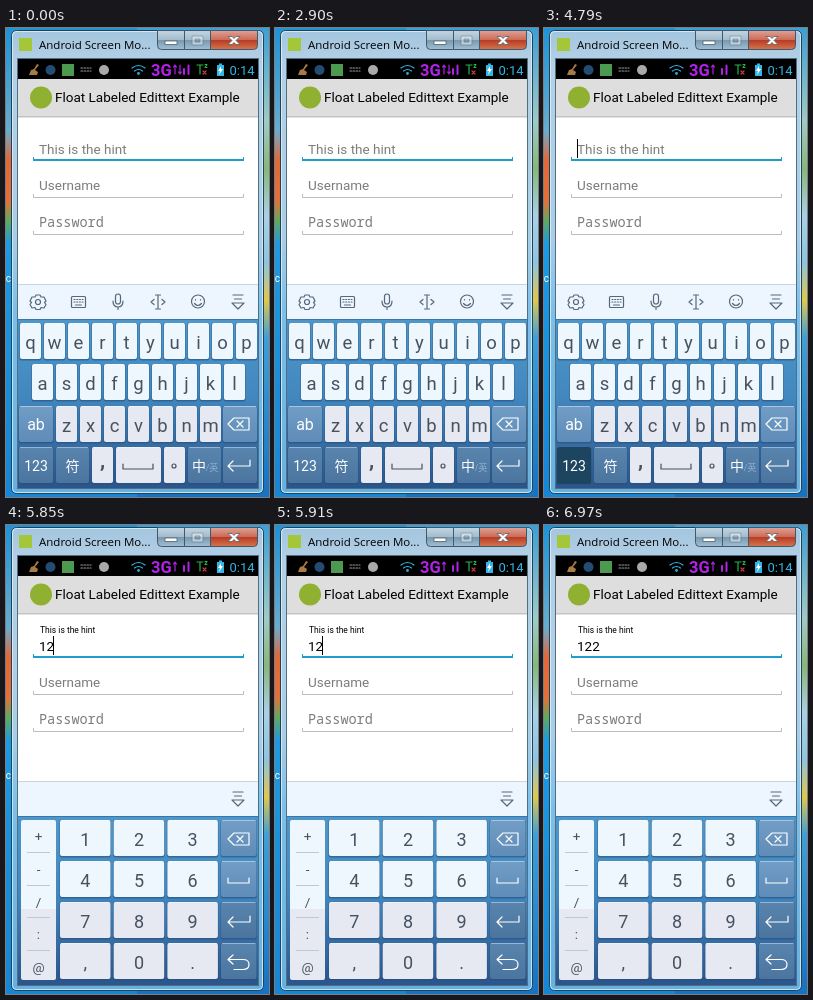
Recreate the animation shown at these times as an HTML page. Size 263 by 469 pixels, loop 8000 ms.

```html
<!DOCTYPE html>
<html lang="en">
<head>
<meta charset="utf-8">
<title>Float label demo</title>
<style>
html, body { margin: 0; width: 100%; height: 100%; overflow: hidden; background: #2c8dcc; }
svg { display: block; width: 100vw; height: 100vh; }
text { font-family: Roboto, "Noto Sans CJK SC", "Noto Sans CJK", sans-serif; font-size: 13.5px; }
.hint { fill: #7d7d7d; }
.mono { font-family: "Noto Sans Mono", monospace; font-size: 13.5px; }
.title { font-family: "Open Sans", "Noto Sans", sans-serif; font-size: 11.5px; }
.key { font-size: 18px; text-anchor: middle; fill: #465260; }
.line { fill: none; stroke-width: 1.2; stroke-linecap: round; stroke-linejoin: round; }
.tool { stroke: #56677a; }
.white { stroke: #fff; }
.rest, .press, .early, .late, .one, .two { animation: 8s step-end infinite; }
.rest { animation-name: rest; }
.press { animation-name: press; }
.early { animation-name: early; }
.late { animation-name: late; }
.one { animation-name: one; }
.two { animation-name: two; }
@keyframes rest { 0% { visibility: visible } 59.875%, 100% { visibility: hidden } }
@keyframes press { 0% { visibility: hidden } 59.875% { visibility: visible } 73.125%, 100% { visibility: hidden } }
@keyframes early { 0% { visibility: visible } 73.125%, 100% { visibility: hidden } }
@keyframes late { 0% { visibility: hidden } 73.125%, 100% { visibility: visible } }
@keyframes one { 0% { visibility: hidden } 73.125% { visibility: visible } 87.125%, 100% { visibility: hidden } }
@keyframes two { 0% { visibility: hidden } 87.125%, 100% { visibility: visible } }
</style>
</head>
<body>
<svg viewBox="0 0 263 469" preserveAspectRatio="none">
  <defs>
    <linearGradient id="deskLeft" x2="0" y2="1">
      <stop offset="0" stop-color="#1f93d6"/><stop offset=".22" stop-color="#6aaccd"/>
      <stop offset=".28" stop-color="#e2683a"/><stop offset=".37" stop-color="#e2703a"/>
      <stop offset=".41" stop-color="#62a95a"/><stop offset=".46" stop-color="#1c9ae2"/>
      <stop offset="1" stop-color="#1686d6"/>
    </linearGradient>
    <linearGradient id="deskRight" x2="0" y2="1">
      <stop offset="0" stop-color="#3b9fd6"/><stop offset=".2" stop-color="#9fcbc4"/>
      <stop offset=".3" stop-color="#86b878"/><stop offset=".4" stop-color="#a9d1e6"/>
      <stop offset=".5" stop-color="#8fc4e0"/><stop offset=".58" stop-color="#e0c84a"/>
      <stop offset=".66" stop-color="#3f9fd8"/><stop offset="1" stop-color="#1672c2"/>
    </linearGradient>
    <linearGradient id="glass" x2="0" y2="1">
      <stop offset="0" stop-color="#a3c5df"/><stop offset=".07" stop-color="#b4d0e5"/>
      <stop offset=".45" stop-color="#a9cde6"/><stop offset=".6" stop-color="#7cc0ea"/>
      <stop offset="1" stop-color="#66b0e0"/>
    </linearGradient>
    <linearGradient id="button" x2="0" y2="1">
      <stop offset="0" stop-color="#c3d5e2"/><stop offset=".48" stop-color="#a4bccd"/>
      <stop offset=".5" stop-color="#7697ae"/><stop offset="1" stop-color="#9fc0d3"/>
    </linearGradient>
    <linearGradient id="close" x2="0" y2="1">
      <stop offset="0" stop-color="#e0a296"/><stop offset=".48" stop-color="#cc6c59"/>
      <stop offset=".5" stop-color="#b83a23"/><stop offset="1" stop-color="#d4764e"/>
    </linearGradient>
    <linearGradient id="board" x2="0" y2="1">
      <stop offset="0" stop-color="#4f97c9"/><stop offset=".45" stop-color="#4288bf"/>
      <stop offset="1" stop-color="#2b558b"/>
    </linearGradient>
    <linearGradient id="blue" x2="0" y2="1">
      <stop offset="0" stop-color="#719dc6"/><stop offset="1" stop-color="#5f8cb8"/>
    </linearGradient>
    <linearGradient id="deep" x2="0" y2="1">
      <stop offset="0" stop-color="#5884ad"/><stop offset="1" stop-color="#4b759f"/>
    </linearGradient>
    <g id="fold" class="line tool">
      <path d="M227 267h10M228.500 271h7M226 275h12l-6 6z"/>
    </g>
    <g id="erase" class="line white">
      <path d="M222 0l6-6h15v12h-15zM231-3l6 6m0-6l-6 6"/>
    </g>
    <path id="enter" class="line white" d="M244-5V1H222m5-5l-5 5 5 5"/>
  </defs>

  <!-- desktop and window -->
  <rect width="132" height="469" fill="url(#deskLeft)"/>
  <rect x="131" width="132" height="469" fill="url(#deskRight)"/>
  <text x="-3" y="254" fill="#fff" style="font-size:10px">Ic</text>
  <rect x="5.5" y="2.500" width="252" height="463" rx="5" fill="url(#glass)" stroke="#234256"/>
  <rect x="6.500" y="3.500" width="250" height="461" rx="4" fill="none" stroke="#e0f0f9" stroke-opacity=".8"/>
  <rect x="11.500" y="30.500" width="241" height="430" fill="#fff" stroke="#4f7084"/>
  <rect x="13" y="10" width="13" height="13" fill="#a4c639"/>
  <text class="title" x="33" y="21">Android Screen Mo...</text>
  <g stroke="#405a6b">
    <path d="M151.500 2.500V17.500q0 4 4 4H178.500V2.500z" fill="url(#button)"/>
    <path d="M178.500 2.500V21.500H204.500V2.500z" fill="url(#button)"/>
    <path d="M204.500 2.500V21.500H247.500q4 0 4-4V2.500z" fill="url(#close)"/>
    <g fill="#fff" stroke="#52616c" stroke-width=".8">
      <rect x="159" y="13" width="12" height="3.500"/>
      <path fill-rule="evenodd" opacity=".45" d="M186 8h11v9h-11zM189 11h5v3h-5z"/>
      <path d="M222 8.500h4l2 2 2-2h4l-4 4 4 4h-4l-2-2-2 2h-4l4-4z"/>
    </g>
  </g>

  <!-- status bar -->
  <rect x="12" y="31" width="240" height="20"/>
  <path d="M31 36l2 1-4 5 3 2-1 3h-8l2-5 3-1z" fill="#a87a45"/>
  <circle cx="44.500" cy="42" r="5" fill="#234c75"/>
  <rect x="56" y="36" width="12" height="12" fill="#4c9a4f"/>
  <path class="line" stroke="#9a9a9a" stroke-dasharray="1.500 1.500" d="M75 40h10M75 43h10"/>
  <circle cx="98" cy="42" r="5" fill="#a9a9a9"/>
  <g class="line" stroke="#33b5e5" stroke-width="2">
    <path d="M126 40q6.500-5 13 0M128.500 43q4-3 8 0"/>
    <circle cx="132.500" cy="45.500" r=".8"/>
  </g>
  <text x="145" y="47.500" font-weight="700" fill="#b321e8" style="font-size:16.5px">3G</text>
  <g class="line" stroke="#b321e8">
    <path d="M169 46V37m-1.500 2l1.500-2 1.500 2"/>
    <path class="rest" d="M174 37v9m-1.500-2l1.500 2 1.500-2"/>
    <path stroke-width="2" d="M178 46V41M182.500 46V37.500"/>
  </g>
  <path class="line" stroke="#26b44b" d="M191 37h6M194 37v9M199 36.500h2l-2 3h2"/>
  <path class="line" stroke="#d33a3a" d="M197 43l3 3m0-3l-3 3"/>
  <path fill="#33b5e5" d="M211 37h2v-1.500h3V37h2v11h-7z"/>
  <path fill="#fff" d="M215 38l-3 5h2l-1 4 4-6h-2z"/>
  <text x="223.500" y="46.500" fill="#33b5e5" style="font-size:13px">0:14</text>

  <!-- action bar and form -->
  <rect x="12" y="51" width="240" height="38" fill="#dedede"/>
  <rect x="12" y="88" width="240" height="1.500" fill="#c4c4c4"/>
  <circle cx="35" cy="69.500" r="11" fill="#8fb030"/>
  <text x="49" y="74">Float Labeled Edittext Example</text>

  <text class="hint early" x="33" y="126">This is the hint</text>
  <text class="late" x="34" y="108" style="font-size:8.5px">This is the hint</text>
  <text class="one" x="33" y="126">12</text>
  <text class="two" x="33" y="126">122</text>
  <rect class="press" x="33" y="111" width="1" height="19"/>
  <rect class="one" x="47" y="111" width="1" height="19"/>
  <path d="M27 129h1v2h209V129h1v4H27z" fill="#1f9ccb"/>
  <text class="hint" x="33" y="162">Username</text>
  <text class="hint mono" x="33" y="199">Password</text>
  <path d="M27.500 166v3.500h210V166M27.500 203v3.500h210V203" fill="none" stroke="#bcbcbc"/>

  <!-- keyboard -->
  <rect x="12" y="256" width="240" height="35" fill="#edf6fe"/>
  <path d="M12 256.500h240" stroke="#cbd5dd"/>
  <rect x="12" y="291" width="240" height="169" fill="url(#board)"/>
  <path d="M12 291.500h240" stroke="#3675ad"/>
  <use href="#fold"/>
  <g class="early line tool">
    <path d="M30 267h4l1 2 3 0 2 4-1.500 1.500 1.500 2-2 3.500-3-.5-1 2h-4l-1-2-3 .5-2-3.500 1.500-2-1.500-1.500 2-4h3z"/>
    <circle cx="32" cy="274" r="2.500"/>
    <rect x="65.500" y="268.500" width="14" height="11" rx="1"/>
    <path d="M68 271.500h9M68 274h9" stroke-dasharray="1 1.700"/><path d="M69.500 277h6"/>
    <rect x="109.500" y="266" width="5" height="10" rx="2.500"/>
    <path d="M107 273q0 6 5 6t5-6M112 279v2.500"/>
    <path d="M149.500 267h5M152 267v14M149.500 281h5M148 271.500l-3 2.500 3 2.500M156 271.500l3 2.500-3 2.500"/>
    <circle cx="192" cy="273.500" r="6.500"/>
    <path d="M189.500 271.500v.5M194.500 271.500v.5M188.500 275.500q3.500 4 7 0"/>
  </g>
  <g class="early" id="letters"></g>
  <g class="press">
    <rect x="13" y="419" width="34" height="37" rx="2" fill="#1e4560"/>
    <text class="key" x="30" y="443" style="font-size:14px;fill:#fff">123</text>
  </g>
  <g class="early">
    <use href="#erase" y="396"/><use href="#enter" y="437"/>
    <path class="line" stroke="#465260" d="M117 436v5h30v-5"/>
    <circle class="line" cx="168" cy="438" r="2" stroke="#465260"/>
  </g>
  <g class="late" id="digits"></g>
  <g class="late">
    <path d="M15 297q0-2 2-2h31q2 0 2 2V384H15z" fill="#eff7fe"/>
    <path d="M15 384H50V453q0 2-2 2H17q-2 0-2-2z" fill="#e6e8f2"/>
    <path d="M21 327.500h23M21 360.500h23M21 392.500h23M21 425.500h23" stroke="#bcc8d5"/>
    <g id="signs"></g>
    <use href="#erase" y="314"/><use href="#enter" y="396"/>
    <path class="line white" d="M222 353v5h21v-5M227 430l-5 4.500 5 4.500M222 434.500h15q6 0 6 5t-6 5h-9"/>
  </g>
</svg>
<script>
const LIGHT = '#eff7fe', GREY = '#e6e8f2', BLUE = 'url(#blue)', DEEP = 'url(#deep)';
const INK = '#465260';
const el = id => document.getElementById(id);

function label(x, y, text, size = 18, fill = INK) {
  return `<text class="key" x="${x}" y="${y}" style="font-size:${size}px;fill:${fill}">${text}</text>`;
}

function key(x, y, w, text, fill, size) {
  const ink = fill === BLUE || fill === DEEP ? '#fff' : INK;
  return `<rect x="${x - .5}" y="${y}" width="${w + 1}" height="37.5" rx="2" fill="#254f7c" opacity=".6"/>` +
    `<rect x="${x}" y="${y}" width="${w}" height="36" rx="2" fill="${fill}"/>` +
    `<path d="M${x + 1} ${y + .5}h${w - 2}" stroke="#fff" stroke-opacity=".4"/>` +
    label(x + w / 2, y + (size < 17 ? 24 : 25.5), text, size, ink);
}

const row = (chars, x, y, fill) =>
  [...chars].map((c, i) => key(x + i * 24, y, 21, c, fill, 18.5)).join('');

el('letters').innerHTML =
  row('qwertyuiop', 14, 295, LIGHT) +
  row('asdfghjkl', 26, 336, LIGHT) +
  row('zxcvbnm', 50, 378, GREY) +
  key(13, 378, 34, 'ab', BLUE, 16) +
  key(217, 378, 34, '', BLUE, 16) +
  key(13, 419, 34, '123', DEEP, 14) +
  key(50, 419, 33, '符', DEEP, 14) +
  key(86, 419, 21, '', GREY, 19) +
  label(96.5, 439, '<tspan font-weight="700">,</tspan>', 21) +
  key(110, 419, 45, '', GREY, 16) +
  key(158, 419, 21, '', GREY, 16) +
  key(182, 419, 33, '', DEEP, 14) +
  label(193, 443, '中', 14, '#fff') +
  label(206, 443, '/英', 9, '#8fb0cf') +
  key(217, 419, 34, '', DEEP, 16);

el('digits').innerHTML = ['123', '456', '789', ',0.'].map((chars, r) => {
  const y = Math.round(295 + r * 41.1);
  return [...chars].map((c, i) => key(54 + i * 53.7, y, 50.5, c, r < 2 ? LIGHT : GREY, 18)).join('') +
    key(215, y, 35.5, '', r < 2 ? BLUE : DEEP, 16);
}).join('');

el('signs').innerHTML = [...'+-/:@'].map((c, i) => label(32.5, 316 + i * 32.8, c, 13.5)).join('');
</script>
</body>
</html>
```
